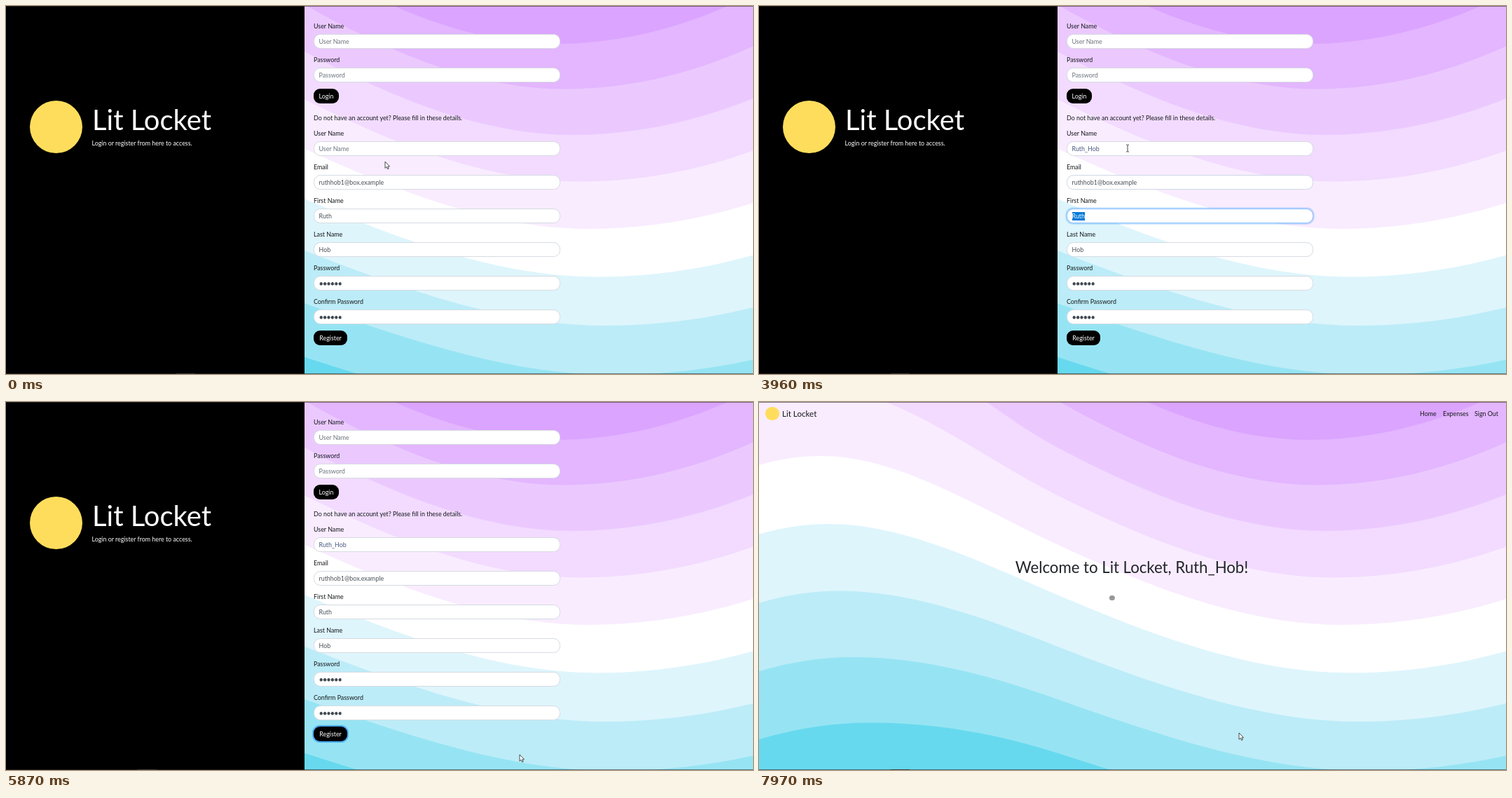
Write an HTML page that moves like this. It is 1066 by 525 pixels and loops after 8 s.

```html
<!DOCTYPE html>
<html lang="en">
<head>
<meta charset="utf-8">
<title>Sign up</title>
<style>
html, body { margin: 0; width: 100%; height: 100%; overflow: hidden; background: #000; }
#stage { position: relative; width: 1066px; height: 525px; overflow: hidden; font: 8.88px/12px Lato, sans-serif; color: #15181b; }
#stage * { box-sizing: border-box; }
#waves, .page, .abs { position: absolute; }
#waves, .page { left: 0; top: 0; width: 1066px; height: 525px; }
.abs { white-space: pre; }
.panel { left: 0; top: 0; width: 426px; height: 525px; background: #000; }
.logo { border-radius: 50%; background: #ffdd5c; }
.title { left: 123px; top: 138px; font-size: 40px; line-height: 48px; color: #fff; }
.sub { left: 122.5px; top: 189.5px; color: #fff; }
.label { left: 439px; }
.field { left: 439px; width: 352px; height: 21px; padding: 4px 0 0 6.5px; border: 1px solid; border-radius: 9.5px; background: #fff; color: #495057; line-height: 11.5px; }
.field span { display: inline-block; vertical-align: top; height: 11.5px; }
.hint { color: #6c757d; }
.dots { --dot: #414850; width: 32.4px; background: radial-gradient(circle at 50% 53%, var(--dot) 1.9px, transparent 2.5px) 0 0 / 5.4px 100%; }
.sel { background-color: #0078d7; color: #fff; --dot: #fff; }
.caret { width: 1px; margin-right: -1px; background: #222; }
.btn { left: 439px; height: 21px; border-radius: 9px; background: #000; color: #fff; line-height: 21px; text-align: center; }
.welcome { left: 0; top: 221px; width: 1064px; text-align: center; font-size: 22.2px; line-height: 30px; color: #212529; }
.brand { left: 33px; top: 9.5px; font-size: 11.6px; line-height: 14px; }
.nav { top: 11px; }
#ball { left: -3.6px; top: 276.2px; width: 7.2px; height: 7.2px; border-radius: 50%; }
.edge { left: 0; width: 1066px; height: 1px; background: rgba(45, 45, 45, .6); }
#task { top: 524px; width: 27px; height: 1px; background: #3c3c3c; }
#mouse { left: 0; top: 0; width: 16px; height: 16px; overflow: visible; }
</style>
</head>
<body>
<div id="stage">
  <svg id="waves" viewBox="0 0 1066 525"></svg>
  <div class="page" id="login">
    <div class="abs panel"></div>
    <div class="abs logo" style="left:34px;top:135px;width:75px;height:75px"></div>
    <div class="abs title">Lit Locket</div>
    <div class="abs sub">Login or register from here to access.</div>
    <div class="abs label" style="top:153.5px">Do not have an account yet? Please fill in these details.</div>
    <div class="abs btn" style="top:118px;width:36px">Login</div>
    <div class="abs btn" id="register" style="top:463px;width:48px">Register</div>
  </div>
  <div class="page" id="home">
    <div class="abs logo" style="left:9px;top:6.5px;width:19.5px;height:19.5px"></div>
    <div class="abs brand">Lit Locket</div>
    <div class="abs nav" style="left:943px">Home</div>
    <div class="abs nav" style="left:976px">Expenses</div>
    <div class="abs nav" style="left:1021px">Sign Out</div>
    <div class="abs welcome">Welcome to Lit Locket, Ruth_Hob!</div>
    <div class="abs" id="ball"></div>
  </div>
  <div class="abs edge" style="top:0"></div>
  <div class="abs edge" style="top:524px"></div>
  <div class="abs" id="task"></div>
  <svg class="abs" id="mouse" viewBox="0 0 16 16">
    <path id="arrow" d="M0 0V9.4L2.2 7.4L3.7 10.7L5.2 10L3.8 6.9H6.5Z" fill="#fff" stroke="#222" stroke-width=".8"/>
    <path id="beam" d="M-2-5H-.5L0-4.5L.5-5H2M0-4.5V4.5M-2 5H-.5L0 4.5L.5 5H2" fill="none" stroke="#333" stroke-width=".9"/>
    <path id="hand" d="M-1 5V.8Q0-.6 1 .8V4Q4.6 4 5 5.5V8L4 10.5H-.5L-3.4 6.6Q-3.2 5.2-1 7Z" fill="#fff" stroke="#222" stroke-width=".8"/>
  </svg>
</div>
<script>
const LOOP = 8000, LOAD = 5910, FADE = 150;
const $ = id => document.getElementById(id);
const clamp = v => Math.max(0, Math.min(1, v));
const smooth = v => v * v * (3 - 2 * v);

const bands = ['#dba4ff', '#e3b6ff', '#ebc9ff', '#f2dbff', '#f9ecff',
               '#fff', '#def5fc', '#bcecf8', '#96e4f3', '#67d9ee'];

// One wave family: crest on the left, trough on the right, n = -4 at the top to 4
function wavePath(n) {
  const left = 90 + 99 * n - .3 * n * n;
  const right = 281 + 74.5 * n;
  const crest = { x: 88 + 9 * n + 2.2 * n * n, y: 77 + 97.5 * n - .6 * n * n, s: 0 };
  const middle = { x: 425, y: 203 + 71 * n + .85 * n * n, s: .46 - .035 * n };
  const trough = { x: 832 + 12 * n, y: 318 + 68 * n + .5 * n * n, s: 0 };
  const knots = [
    { x: 0, y: left, s: 2 * (crest.y - left) / crest.x },
    crest, middle, trough,
    { x: 1066, y: right, s: 2 * (right - trough.y) / (1066 - trough.x) }
  ];
  let d = `M0 ${left}`;
  for (let i = 1; i < knots.length; i++) {
    const a = knots[i - 1], b = knots[i], h = (b.x - a.x) / 3;
    d += `C${a.x + h} ${a.y + a.s * h} ${b.x - h} ${b.y - b.s * h} ${b.x} ${b.y}`;
  }
  return d + 'V800H0Z';
}

$('waves').innerHTML = `<rect width="1066" height="525" fill="${bands[0]}"/>` +
  bands.slice(1).map((fill, i) => `<path fill="${fill}" d="${wavePath(i - 4)}"/>`).join('');

const hint = text => `<span class="hint">${text}</span>`;
const plain = text => `<span>${text}</span>`;
const dots = '<span class="dots"></span>';

function addField(label, top, html) {
  $('login').insertAdjacentHTML('beforeend',
    `<div class="abs label" style="top:${top - 17.5}px">${label}</div>
     <div class="abs field" style="top:${top}px">${html}</div>`);
  return $('login').lastElementChild;
}

['User Name', 'Password'].forEach((label, i) => addField(label, 40 + 48 * i, hint(label)));
const inputs = [
  ['User Name', hint('User Name')],
  ['Email', plain('ruthhob1@box.example')],
  ['First Name', plain('Ruth')],
  ['Last Name', plain('Hob')],
  ['Password', dots],
  ['Confirm Password', dots]
].map(([label, html], i) => addField(label, 193 + 48 * i, html));
const boxes = [...document.querySelectorAll('.field')];

// Focus goes down the form; the last stop is the button
const stops = [...inputs.slice(0, 5), $('register')];
const focusTimes = [855, 3420, 3840, 4090, 4440, 5460];
const focusAt = t => focusTimes.filter(f => f <= t).length - 1;

const NAME = 'Ruth_Hob';
const keyTimes = [1590, 1820, 1930, 2080, 2380, 2810, 3110, 3240];

// Pointer key points: [time, x, y]
const track = [
  [30, 541, 222], [820, 526, 203], [4100, 526, 203], [4270, 525, 210], [4460, 525, 210],
  [4700, 496, 404], [5250, 464, 473], [5450, 464, 473], [5870, 733, 503],
  [6270, 712, 505], [6630, 686, 473], [7090, 685, 472]
];

const slope = (i, axis) => (track[i + 1][axis] - track[i][axis]) / (track[i + 1][0] - track[i][0]);

// Velocity at a key point: zero at rests and turns, so the path never overshoots
function speed(i, axis) {
  if (i === 0 || i === track.length - 1) return 0;
  const a = slope(i - 1, axis), b = slope(i, axis);
  return a * b > 0 ? 2 * a * b / (a + b) : 0;
}

function pointerAt(t, axis) {
  const last = track.length - 1;
  t = Math.max(track[0][0], Math.min(track[last][0], t));
  const i = Math.min(last - 1, track.filter(p => p[0] <= t).length - 1);
  const span = track[i + 1][0] - track[i][0];
  const u = (t - track[i][0]) / span, v = 1 - u;
  const from = track[i][axis], to = track[i + 1][axis];
  return from + (to - from) * smooth(u) +
    span * u * v * (speed(i, axis) * v - speed(i + 1, axis) * u);
}

function drawPointer(t) {
  const x = pointerAt(t, 1), y = pointerAt(t, 2);
  const over = el => x >= el.offsetLeft && x <= el.offsetLeft + el.offsetWidth &&
    y >= el.offsetTop && y <= el.offsetTop + el.offsetHeight;
  const form = t < LOAD;
  const shape = form && over($('register')) ? 'hand' : form && boxes.some(over) ? 'beam' : 'arrow';
  for (const id of ['arrow', 'beam', 'hand']) $(id).style.display = id === shape ? '' : 'none';
  $('mouse').style.transform = `translate(${x}px,${y}px)`;
}

function drawUser(t) {
  const user = inputs[0], focus = focusAt(t);
  const typed = keyTimes.filter(k => k <= t).length;
  const since = t - (typed ? keyTimes[typed - 1] : 830);
  const caret = focus === 0 && since % 1000 < 500 ? '<span class="caret"></span>' : '';
  user.innerHTML = typed ? plain(NAME.slice(0, typed)) + caret : caret + hint('User Name');
  user.style.color = focus > 0 ? '#48557f' : '#343a40';
}

function drawFocus(t) {
  const focus = focusAt(t);
  stops.forEach((el, i) => {
    const on = smooth(clamp((t - focusTimes[i]) / FADE));
    const off = i < stops.length - 1 ? smooth(clamp((t - focusTimes[i + 1]) / FADE)) : 0;
    const k = on * (1 - off);
    const alpha = el === $('register') ? .5 : .25;
    el.style.boxShadow = `0 0 0 ${1.9 * k}px rgba(0,123,255,${alpha * k})`;
    el.style.borderColor = `color-mix(in srgb, #80bdff ${k * 100}%, #d6dbe1)`;
    if (i > 0 && el !== $('register')) el.firstChild.classList.toggle('sel', i === focus);
  });
}

function drawBall(t) {
  const c = Math.cos(Math.PI * (t - 6800) / 937);
  const grey = Math.round(172 + 28 * c);
  $('ball').style.transform = `translateX(${538.75 + 49.25 * c}px)`;
  $('ball').style.background = `rgb(${grey},${grey},${grey})`;
}

function draw(t) {
  const loaded = t >= LOAD;
  $('login').style.visibility = loaded ? 'hidden' : 'visible';
  $('home').style.visibility = loaded ? 'visible' : 'hidden';
  $('task').style.left = (t < 30 ? 243 : 188) + 'px';
  drawUser(t);
  drawFocus(t);
  drawBall(t);
  drawPointer(t);
}

boxes.forEach(el => el.style.borderColor = '#d6dbe1');
const start = performance.now();
function tick() {
  draw((performance.now() - start) % LOOP);
  requestAnimationFrame(tick);
}
tick();
</script>
</body>
</html>
```
